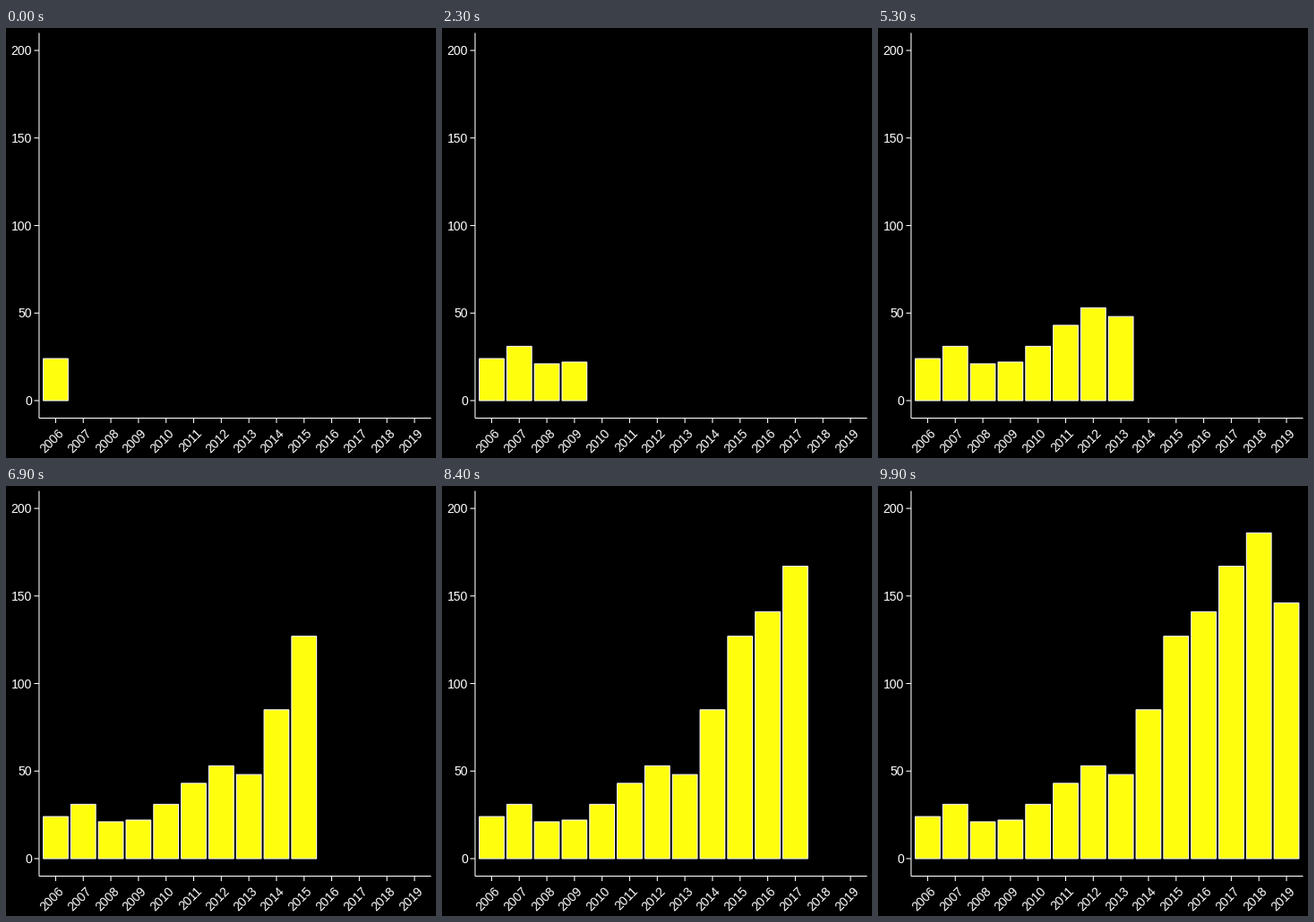
A matplotlib script for the animation above (10000 ms loop, 480 px wide and 480 px high).

```python
import matplotlib.pyplot as plt
from matplotlib.animation import FuncAnimation
from matplotlib.patches import Rectangle

SIZE, DPI = 480, 72
STEP_MS, LOOP_MS = 100, 10000

COUNTS = [24, 31, 21, 22, 31, 43, 53, 48, 85, 127, 141, 167, 186, 146]
STARTS = [0, 800, 1500, 2300, 3000, 3800, 4600, 5300,
          6100, 6900, 7600, 8400, 9100, 9900]
FIRST_YEAR = 2006

LEFT, RIGHT, TOP, BOTTOM = 36.95, 474.5, 5.5, 435.5
TICK = 5.5
LINE = 1.07
PITCH = (RIGHT - LEFT) / 14.2
BAR_W = 0.9 * PITCH

plt.rcParams["font.family"] = "Liberation Sans"
plt.rcParams["font.size"] = 14


def x_pos(i):
    return LEFT + (i + 0.6) * PITCH


def y_pos(value):
    return BOTTOM - (value + 10) * (BOTTOM - TOP) / 220


fig = plt.figure(figsize=(SIZE / DPI, SIZE / DPI), dpi=DPI, facecolor="black")
ax = fig.add_axes([0, 0, 1, 1])
ax.set_xlim(0, SIZE)
ax.set_ylim(SIZE, 0)
ax.axis("off")


def line(x0, y0, x1, y1):
    ax.plot([x0, x1], [y0, y1], color="white", lw=LINE,
            solid_capstyle="butt", snap=False)


line(LEFT, TOP, LEFT, BOTTOM)
line(LEFT, BOTTOM, RIGHT, BOTTOM)

for value in range(0, 201, 50):
    y = y_pos(value)
    line(LEFT - TICK, y, LEFT, y)
    ax.text(28.9, y + 5.2, str(value), color="white",
            ha="right", va="baseline")

bars = []
for i, count in enumerate(COUNTS):
    x = x_pos(i)
    line(x, BOTTOM, x, BOTTOM + TICK)
    ax.text(x + 9.8, 453.1, str(FIRST_YEAR + i), color="white", rotation=45,
            rotation_mode="anchor", ha="right", va="baseline")
    bar = Rectangle((x - BAR_W / 2, y_pos(count)), BAR_W,
                    y_pos(0) - y_pos(count), facecolor="#ffff0d",
                    edgecolor="white", lw=LINE, joinstyle="miter",
                    snap=False, zorder=3)
    bars.append(ax.add_patch(bar))


def update(frame):
    now = frame * STEP_MS
    for bar, start in zip(bars, STARTS):
        bar.set_visible(now >= start)
    return bars


anim = FuncAnimation(fig, update, frames=LOOP_MS // STEP_MS,
                     interval=STEP_MS, repeat=True, repeat_delay=0)
plt.show()
```
